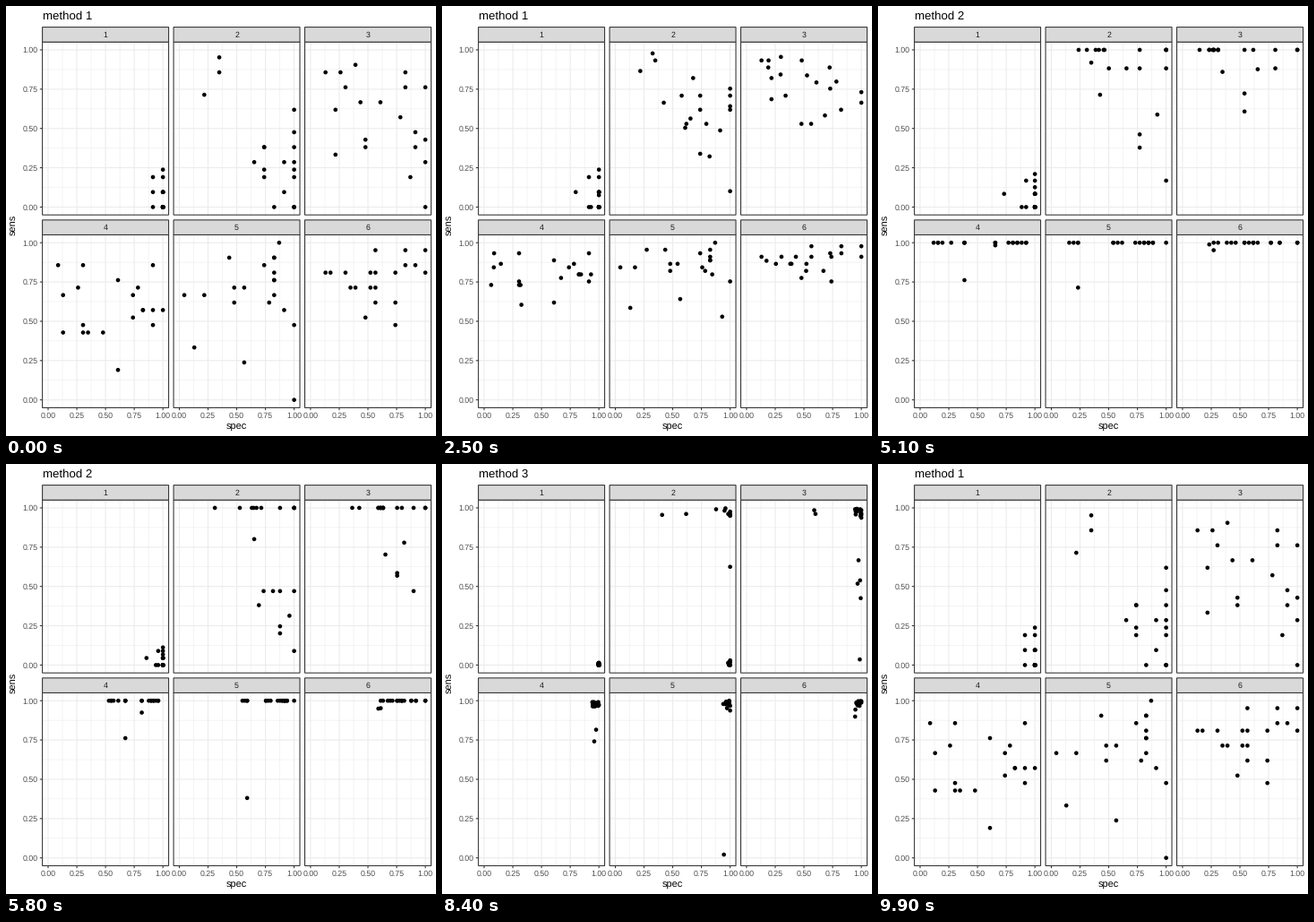
A matplotlib script that plays this animation: 480x480 px, repeating every 10 s.

```python
import matplotlib.pyplot as plt
import numpy as np
from matplotlib.animation import FuncAnimation
from matplotlib.patches import Circle, Rectangle

plt.rcParams.update({"font.family": "Liberation Sans", "path.snap": False,
                     "text.hinting": "none", "toolbar": "None"})

SIZE, DPI = 480, 72
LEFT, TOP = 40.6, 40.2             # corner of the first panel
WIDE, HIGH = 140.97, 193.0         # panel size
STEP_X, STEP_Y = 146.47, 215.25    # distance between panels
STRIP = 16.6
SPEC_N, SENS_N = 23, 21            # values are counts out of these
INK, GRID = "#333333", "#ebebeb"
TICKS = np.linspace(0, 1, 5)
MINOR = TICKS[:-1] + 0.125

fig = plt.figure(figsize=(SIZE / DPI, SIZE / DPI), dpi=DPI, facecolor="white")
ax = fig.add_axes([0, 0, 1, 1])
ax.set_xlim(0, SIZE)
ax.set_ylim(SIZE, 0)
ax.axis("off")


def to_x(col, v):
    return LEFT + STEP_X * col + WIDE * (0.05 + v) / 1.1


def to_y(row, v):
    return TOP + STEP_Y * row + HIGH * (1.05 - v) / 1.1


def line(x, y, color, width, z=1):
    ax.plot(x, y, color=color, lw=width, zorder=z, solid_capstyle="butt")


def label(x, y, text, size, color="black", **kw):
    return ax.text(x, y, text, size=size, color=color,
                   **{"va": "baseline", "ha": "center", **kw})


def draw_panel(n):
    row, col = divmod(n, 3)
    x, y = LEFT + STEP_X * col, TOP + STEP_Y * row
    for values, width in ((MINOR, 0.53), (TICKS, 1.07)):
        for v in values:
            line([to_x(col, v)] * 2, [y, y + HIGH], GRID, width)
            line([x, x + WIDE], [to_y(row, v)] * 2, GRID, width)
    ax.add_patch(Rectangle((x, y), WIDE, HIGH, fill=False, ec=INK, lw=1.07, zorder=4))
    ax.add_patch(Rectangle((x, y - STRIP), WIDE, STRIP, fc="#d9d9d9", ec=INK,
                           lw=1.07, zorder=4))
    label(x + WIDE / 2, y - STRIP / 2 + 3.2, str(n + 1), 8.8, "#1a1a1a", zorder=5)
    for v in TICKS:
        if col == 0:
            ty = to_y(row, v)
            line([x - 2.75, x], [ty, ty], INK, 1.07)
            label(x - 4.95, ty + 3.2, f"{v:.2f}", 8.8, "#4d4d4d", ha="right")
        if row == 1:
            tx = to_x(col, v)
            line([tx, tx], [y + HIGH, y + HIGH + 2.75], INK, 1.07)
            label(tx, y + HIGH + 11.3, f"{v:.2f}", 8.8, "#4d4d4d")


tracks = []


def add_track(n, j1, k1, j2, k2, j3=SPEC_N, k3=0):
    row, col = divmod(n, 3)
    tracks.append([(to_x(col, j / SPEC_N), to_y(row, k / SENS_N))
                   for j, k in ((j1, k1), (j2, k2), (j3, k3))])


def add_points(n, rising, others):
    """rising: sens -> specs of points that go to full sens and then to the
    top right corner; a pair also changes its spec on the way.
    others: full tracks, ending in the bottom right corner by default."""
    for k, specs in rising.items():
        for s in specs:
            j1, j2 = s if isinstance(s, tuple) else (s, s)
            add_track(n, j1, k, j2, SENS_N, SPEC_N, SENS_N)
    for t in others:
        add_track(n, *t)


add_points(0, {}, [
    (21, 2, 16, 2), (21, 4, 21, 4), (21, 0, 21, 0), (23, 5, 23, 5),
    (23, 4, 23, 4), (23, 0, 23, 3), (23, 0, 20, 0),
] + [(23, 2, 23, 2)] * 4 + [(23, 0, 23, 0)] * 9)

add_points(1, {
    20: [(8, 7)], 15: [5], 13: [(23, 9)], 8: [17, 23], 5: [23], 4: [23],
}, [
    (8, 18, 8, 21, 21, 21), (17, 8, 10, 21, 14, 21), (15, 6, 5, 21, 9, 21),
    (23, 0, 6, 20, 23, 14), (23, 6, 8, 17), (21, 6, 21, 14), (17, 5, 17, 9),
    (21, 2, 17, 11), (23, 0, 23, 4), (19, 0, 10, 21), (23, 0, 14, 21),
    (17, 4, 17, 21), (23, 10, 23, 21),
])

add_points(2, {
    19: [(9, 5)], 18: [3, (6, 3), (19, 4)], 16: [(23, 11)], 14: [(10, 4)],
    13: [5], 10: [(21, 13)], 9: [23], 7: [5], 6: [23], 4: [(20, 18)],
    0: [(23, 4)],
}, [
    (7, 16, 2, 21, 14, 21), (11, 8, 5, 21, 14, 21), (14, 14, 14, 19, 23, 14),
    (19, 16, 6, 19, 23, 11), (11, 9, 11, 13, 23, 11), (21, 8, 11, 16, 23, 9),
    (18, 12, 18, 21),
])

add_points(3, {
    18: [2, 7, 21], 16: [14], 15: [(6, 1), 18], 14: [(3, 1), 17],
    12: [19, 19, (21, 18), (23, 20)], 11: [(17, 14)], 10: [7, 21],
    9: [(3, 0), 7, (11, 4)],
}, [(8, 9, 7, 16, 23, 16), (14, 4, 14, 21, 23, 18)])

add_points(4, {
    21: [20], 19: [(10, 3), (19, 2), 19], 18: [17], 17: [19], 16: [19, 19],
    15: [11, (13, 12)], 14: [1, (5, 3), (19, 16)], 13: [11, 18],
    12: [(21, 18)], 10: [23], 5: [13], 0: [(23, 20)],
}, [(3, 7, 3, 17)])

add_points(5, {
    20: [13, 19, 23], 18: [19, (21, 13)], 17: [7, (12, 8), 13, 17, 23],
    15: [(8, 4), 9, 12, (13, 5)], 13: [(13, 11), (17, 14)], 11: [11], 10: [17],
}, [(3, 17, 3, 21, 23, 19), (4, 17, 4, 20, 23, 20)])

for n in range(6):
    draw_panel(n)

mid_x = LEFT + STEP_X + WIDE / 2
mid_y = TOP + (STEP_Y + HIGH) / 2
label(mid_x, 472.6, "spec", 11)
label(13.8, mid_y, "sens", 11, rotation=90, ha="right", va="center")
title = label(LEFT, 15, "method 1", 13.2, ha="left")

keys = np.array(tracks).transpose(1, 0, 2)
dots = [ax.add_patch(Circle(p, 2.31, fc="black", lw=0, zorder=3)) for p in keys[0]]


def update(frame):
    phase = np.interp(frame, [16, 33, 49, 66, 83, 99], [0, 1, 1, 2, 2, 3])
    i, t = int(phase), phase % 1
    spots = keys[i % 3] * (1 - t) + keys[(i + 1) % 3] * t
    for dot, spot in zip(dots, spots):
        dot.center = spot
    # the title flips just past the middle of a move
    title.set_text(f"method {int(phase + 0.45) % 3 + 1}")
    return dots + [title]


anim = FuncAnimation(fig, update, frames=100, interval=100, repeat=True,
                     repeat_delay=0, blit=False)
plt.show()
```
